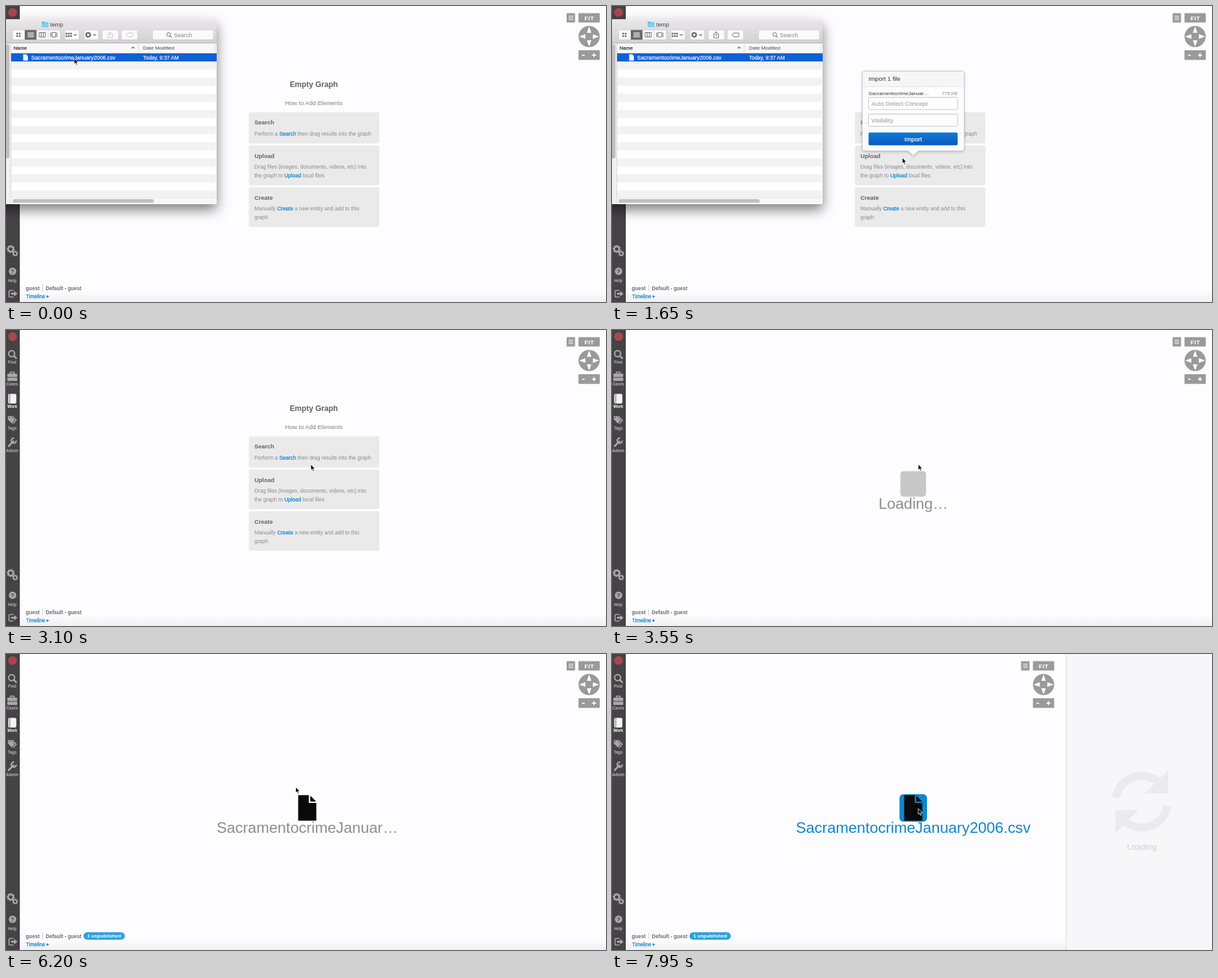
An HTML page that plays this animation: 960 px wide and 475 px high, repeating every 8 s.

```html
<!DOCTYPE html>
<html lang="en">
<head>
<meta charset="utf-8">
<title>File import</title>
<style>
  html, body { margin: 0; width: 100%; height: 100%; overflow: hidden; background: #fdfcfe; }
  svg { display: block; width: 100%; height: 100%; font-family: "Liberation Sans", Arial, sans-serif; }
  text { white-space: pre; }
  .b { font-weight: bold; }
  .mid { text-anchor: middle; }
  .link { fill: #0e86cc; stroke: #0e86cc; stroke-width: .25; }
</style>
</head>
<body>
<svg id="stage" viewBox="0 0 960 475"></svg>
<script>
const LOOP = 8000, STEP = 50;
const FILE = "SacramentocrimeJanuary2006.csv";
const SHORT = "SacramentocrimeJanuar…";
const USER = "guest";
const BLUE = "#0e86cc";

// markup helpers
const text = (x, y, size, fill, str, cls = "", more = "") =>
  `<text x="${x}" y="${y}" font-size="${size}" fill="${fill}" class="${cls}" ${more}>${str}</text>`;
const rect = (x, y, w, h, fill, r = 0, more = "") =>
  `<rect x="${x}" y="${y}" width="${w}" height="${h}" rx="${r}" fill="${fill}" ${more}/>`;
const path = (d, fill, more = "") => `<path d="${d}" fill="${fill}" ${more}/>`;
const line = (d, color, w = 1, more = "") => path(d, "none", `stroke="${color}" stroke-width="${w}" ${more}`);
const circle = (x, y, r, fill, more = "") => `<circle cx="${x}" cy="${y}" r="${r}" fill="${fill}" ${more}/>`;
const group = (id, body, more = "") => `<g id="${id}" ${more}>${body}</g>`;
const grad = (id, ...stops) => `<linearGradient id="${id}" x2="0" y2="1">` +
  stops.map((c, i) => `<stop offset="${i / (stops.length - 1)}" stop-color="${c}"/>`).join("") + `</linearGradient>`;

function defs() {
  return `<defs>
    ${grad("floor", "#fdfcfe", "#f0eff1")}
    ${grad("chrome", "#e9e7e9", "#d2d0d2")}
    ${grad("action", "#0d7bd8", "#0b59bf")}
    <filter id="shade" x="-20%" y="-20%" width="140%" height="150%">
      <feDropShadow dx="0" dy="9" stdDeviation="10" flood-opacity=".5"/></filter>
    <filter id="soft" x="-10%" y="-10%" width="120%" height="125%">
      <feDropShadow dx="0" dy="1.5" stdDeviation="2" flood-opacity=".2"/></filter>
  </defs>`;
}

function gear(x, y, r, color) {
  return circle(x, y, r * .66, "none", `stroke="${color}" stroke-width="${r * .45}"`) +
    circle(x, y, r * .88, "none",
      `stroke="${color}" stroke-width="${r * .32}" pathLength="16" stroke-dasharray="1 1"`);
}

function sidebar() {
  const c = "#a9a7a9";
  const label = (y, s, fill = "#b9b7b9") => text(10, y, 6.3, fill, s, "b mid");
  const rule = y => line(`M0 ${y}H22`, "#373537") + line(`M0 ${y + 1}H22`, "#514f51");
  return rect(0, 0, 22, 475, "#454345") + line("M21.5 0V475", "#3a383a") +
    circle(10.5, 10.5, 7, "#a8474d") +
    circle(9, 38, 4.8, "none", `stroke="${c}" stroke-width="2.2"`) +
    line("M12.6 41.6L16.2 45.2", c, 2.8, 'stroke-linecap="round"') + label(53.5, "Find") +
    rect(2, 70, 16, 5.4, c, 1.5) + rect(2, 76.4, 16, 5.4, c, 1.2) +
    line("M7 70V67.6H13V70", c, 1.6) + label(88.5, "Cases") +
    rect(3.5, 102.5, 13, 15.5, "#f4f3f4", 2) + line("M6 103V117.5", "#5b595b", 1) + label(124.5, "Work", "#fff") +
    path("M3 138H8L14 144.5L9.3 150L3 143.5Z", c) + line("M10 138L16.4 144.8L11.5 150.5", c, 1.7) +
    circle(5.3, 140.3, 1, "#454345") + label(160, "Tags") +
    line("M4.3 186.3L11.8 178.8", c, 3, 'stroke-linecap="round"') +
    line("M13 173.6A4 4 0 1 0 16.4 177.4", c, 2.4) + label(195.5, "Admin") +
    rule(206) + gear(7.6, 390, 6.2, c) + gear(14.7, 397.2, 4.4, c) + rule(411) +
    circle(10.5, 425.8, 6, c) + text(10.5, 429.3, 9.5, "#454345", "?", "b mid") + label(442.5, "Help") +
    line("M12 456.5H6.5Q4.8 456.5 4.8 458.2V465.2Q4.8 467 6.5 467H12", c, 1.6) +
    path("M8 460.3H13V457.5L18.4 461.8L13 466V463.2H8Z", c);
}

function footer() {
  const grey = "#6f6d6f";
  return rect(22, 457, 938, 18, "url(#floor)") +
    text(31.5, 455.5, 8.4, grey, USER, "b") + line("M58.5 447V458", "#cfcdcf") +
    text(63.5, 455.5, 8.25, grey, `Default - ${USER}`, "b") +
    text(32, 469, 8.2, BLUE, "Timeline", "link") + path("M65 464L69 466.2L65 468.4Z", BLUE) +
    group("badge", rect(124, 446.5, 66, 12, "#2aa1de", 6) + text(157, 455.4, 8, "#fff", "1 unpublished", "b mid"));
}

function controls() {
  const c = "#9b999b", w = "#fff";
  const arrow = a => path("M933 33L929.3 43H936.7Z", w, `transform="rotate(${a} 933 49)"`);
  return group("controls",
    rect(897, 11.5, 13.5, 15, c, 1) + line("M900 16.2H907.5M900 19H907.5M900 21.8H907.5", w, 1.1) +
    rect(916, 11.5, 34, 15, c, 1) + text(933.2, 22.5, 9.5, w, "FIT", "b mid", 'letter-spacing=".4"') +
    circle(933, 49, 17, c) + [0, 90, 180, 270].map(arrow).join("") +
    rect(916, 71, 34, 15.5, c, 1) + line("M921.8 79.2H925.8M937.6 78.8H944M940.8 75.6V82", w, 1.7));
}

function hints() {
  const body = "#8b898b", head = "#626062";
  const link = s => `<tspan class="link">${s}</tspan>`;
  const card = (y, h, title, ...rows) => rect(388.5, y, 209, h, "#ebeaeb", 3.5) +
    text(397.5, y + 19.7, 9.45, head, title, "b") +
    rows.map((s, i) => text(397.5, y + 37 + i * 13.6, 8.5, body, s)).join("");
  return group("hints",
    text(492.5, 130, 12.3, head, "Empty Graph", "b mid") +
    text(492.5, 158.7, 9.62, "#807e80", "How to Add Elements", "mid") +
    card(170.5, 50, "Search", `Perform a ${link("Search")} then drag results into the graph`) +
    card(224, 63.5, "Upload", "Drag files (images, documents, videos, etc) into",
      `the graph to ${link("Upload")} local files`) +
    card(291, 63.5, "Create", `Manually ${link("Create")} a new entity and add to this`, "graph"));
}

function popover() {
  const field = (y, s) => rect(410.5, y, 142.5, 19.5, "#fff", 2, 'stroke="#c4c2c4" fill-opacity=".85"') +
    text(415, y + 13.6, 9.75, "#949294", s);
  return group("popover",
    path("M404 104.5H560Q563.5 104.5 563.5 108V229Q563.5 232.5 560 232.5H490L482 240L474 232.5H404Q400.5 232.5 400.5 229V108Q400.5 104.5 404 104.5Z",
      "#fff", 'fill-opacity=".9" stroke="#bcbabc" stroke-width=".8" filter="url(#soft)"') +
    rect(401, 105, 162, 24, "#f6f5f6", 3, 'fill-opacity=".8"') + line("M401 129.5H563", "#e6e5e6") +
    text(410.5, 120.3, 9.76, "#333", "Import 1 file") +
    text(410.5, 143.3, 8.1, "#333", SHORT) +
    text(553, 143.3, 7.7, "#8b898b", "775 KB", "", 'text-anchor="end"') +
    field(146.5, "Auto Detect Concept") + field(173.5, "Visibility") +
    rect(410.5, 203, 142.5, 20.5, "url(#action)", 2) +
    text(482, 216.6, 9.8, "#fff", "Import", "mid", 'stroke="#fff" stroke-width=".25"'));
}

function finder() {
  const ink = "#6a686a", row = 12.95;
  const button = (x, w) => rect(x, 38.5, w, 15.5, "#fbfafb", 2.5, 'stroke="#c6c4c6" stroke-width=".6"');
  let stripes = "";
  for (let i = 1; i < 18; i += 2) stripes += rect(8, 76 + i * row, 328.5, row, "#f3f2f3");
  const dots = [0, 1, 2, 3].map(i => rect(16.5 + i % 2 * 4, 43 + (i >> 1) * 4, 2.6, 2.6, ink)).join("");
  const tiles = [0, 1, 2, 3, 4, 5].map(i =>
    rect(95.5 + i % 3 * 3.6, 43 + (i >> 1 > 0 && i > 2 ? 4 : 0), 2.6, 2.6, ink)).join("");
  const drop = x => line(`M${x} 45.2L${x + 2.3} 47.5L${x + 4.6} 45.2`, ink, 1.1);
  return group("finder",
    rect(-30, 21.5, 367, 296.5, "#fff", 4, 'filter="url(#shade)"') +
    path("M-30 21.5H333Q337 21.5 337 25.5V59.5H-30Z", "url(#chrome)") +
    line("M-30 59.5H337", "#b5b3b5") +
    path("M57 26Q57 25 58 25H61.3L62.4 26.2H67Q68 26.2 68 27.2V33Q68 34 67 34H58Q57 34 57 33Z", "#5dbbe8") +
    rect(57, 27.6, 11, 6.4, "#7fd0f3", 1) +
    text(70.8, 32.8, 9.3, "#444", "temp") +
    button(10.5, 76.5) + rect(30, 38.5, 19, 15.5, "#6b696b") + dots +
    line("M34.5 43H44.5M34.5 45.2H44.5M34.5 47.4H44.5M34.5 49.6H44.5", "#fff") +
    line("M49 38.5V54M67.5 38.5V54", "#d0ced0", .7) +
    line("M53 42.6H63V49.8H53ZM56.3 42.6V49.8M59.7 42.6V49.8", ink) +
    line("M73.5 42.6H79.5V49.8H73.5ZM71.5 42.6V49.8M81.5 42.6V49.8", ink) +
    button(94, 23) + tiles + drop(108.5) +
    button(125, 23) + gear(131.5, 46.3, 4.6, ink) + drop(139.5) +
    button(154, 26) + button(184.5, 26) +
    group("tools",
      line("M165 44.8H163V51H170.5V44.8H168.5M166.7 48.5V41.2M164.7 43L166.7 41L168.7 43", ink) +
      line("M192 46.3L194.5 43.3H202Q203 43.3 203 44.3V48.3Q203 49.3 202 49.3H194.5Z", ink)) +
    button(234.5, 97.5) + circle(260.3, 45.7, 3, "none", `stroke="${ink}"`) + line("M262.5 48L265 50.6", ink, 1.2) +
    text(268.5, 49.6, 9.2, "#858385", "Search") +
    rect(-30, 60, 367, 15.5, "#f8f7f8") + line("M8 75.5H337", "#d5d3d5", .7) +
    line("M211.5 61V75M334.5 61V75", "#d5d3d5", .8) +
    text(12.3, 69.6, 7.9, "#333", "Name", "", 'stroke="#333" stroke-width=".25"') +
    line("M201 68.2L203.3 65.8L205.6 68.2", "#555", 1.1) +
    text(219.3, 69.6, 8.1, "#444", "Date Modified") + stripes +
    rect(8, 76, 329, row, "#0f60d6") +
    path("M27.5 77.5H32.3L35 80.2V87.5H27.5Z", "#fff") + line("M32.3 77.5V80.2H35", "#b9cbe8", .6) +
    text(40.3, 85.8, 8.77, "#fff", FILE, "", 'stroke="#fff" stroke-width=".2"') +
    text(219.3, 85.8, 8.4, "#fff", "Today, 9:37 AM", "", 'stroke="#fff" stroke-width=".2"') +
    rect(-30, 60, 37.5, 258, "#f1f0f1") + line("M7.8 60V318", "#c9c7c9", .8) +
    rect(-4, 61.5, 9.5, 183, "#bfbdbf", 3) +
    rect(8, 308, 328.5, 9.5, "#f8f7f8") + line("M8 308H337", "#e3e2e3", .7) +
    rect(10.5, 310, 226, 5.8, "#c1bfc1", 2.9));
}

function node() {
  const title = (id, s, fill) => text(482, 286.6, 24.4, fill, s, "mid", id);
  const sheet = "M467.5 226.5H484.5V239H496.5V267.5H467.5ZM486.8 227.2L496.3 236.8H486.8Z";
  return group("pending", rect(461.5, 226.5, 41, 41, "#c8c7c8", 5) + title("", "Loading…", "#8f8d8f")) +
    group("untitled", circle(482, 247, 20, "#0a0a0a") + text(482, 258, 31, "#fff", "?", "b mid", 'stroke="#fff" stroke-width=".8"') +
      title("", "No title available", "#8f8d8f")) +
    group("doc", rect(460, 225, 44, 44, BLUE, 6, 'id="halo"') + path(sheet, "#0a0a0a") + title('id="title"', "", ""));
}

function panel() {
  const c = "#ebeaec";
  const half = a => `<g transform="rotate(${a} 847.5 237)">` +
    line("M806.5 230A41.5 41.5 0 0 1 876 207", c, 13) + path("M890 186V223.5H852.5Z", c) + "</g>";
  return group("panel", rect(726.5, -1, 240, 477, "#f7f6f8", 0, 'stroke="#dddcde"') +
    group("spinner", half(0) + half(180) + text(847.5, 314, 13.2, "#d0ced0", "Loading", "mid")));
}

function pointer() {
  const ghost = group("ghost",
    path("M-76 -5H-71L-68 -2V6H-76Z", "#fff", 'stroke="#dddcdd" stroke-width=".5" opacity=".85"') +
    rect(-65.5, -4.5, 140, 11, "#1767d2", 5.5, 'opacity=".92"') +
    text(-63.5, 4, 8.8, "#fff", FILE, "", 'stroke="#fff" stroke-width=".2"'));
  const plus = group("plus", circle(6.5, 15, 6.3, "#1fa321", 'stroke="#17851a" stroke-width=".6"') +
    line("M3 15H10M6.5 11.5V18.5", "#fff", 1.8));
  return group("cursor", ghost +
    group("ring", circle(0, 1, 15, "none", 'stroke="#1d1d1f" stroke-width="1.4"')) +
    path("M0 0V9.2L2.1 7.3L3.6 10.8L5.2 10.1L3.7 6.8H6.6Z", "#000", 'stroke="#fff" stroke-width=".8"') + plus);
}

const stage = document.getElementById("stage");
stage.innerHTML = defs() + rect(0, 0, 960, 475, "#fdfcfe") + footer() + sidebar() + hints() + node() +
  controls() + panel() + popover() + finder() + pointer();

const el = {};
stage.querySelectorAll("[id]").forEach(e => el[e.id] = e);
const show = (id, on) => el[id].setAttribute("opacity", +on);
const move = (id, x, y = 0) => el[id].setAttribute("transform", `translate(${x} ${y})`);
const clamp = v => Math.max(0, Math.min(1, v));
const ease = v => v * v * (3 - 2 * v);
const ramp = (t, a, b) => clamp((t - a) / (b - a));
const within = (t, a, b) => t >= a && t < b;

// time, x, y of the pointer tip
const track = [
  [0, 109, 84], [200, 109, 84], [1080, 462.5, 246], [1500, 462.5, 246], [2350, 486, 216],
  [2800, 486, 216], [3450, 490, 215.5], [3600, 490, 215.5], [4400, 464.5, 215], [5100, 463.5, 213.5],
  [6600, 463.5, 213.5], [7050, 485.5, 246], [7300, 485.5, 246], [7700, 490, 248], [8000, 490, 248]
];

function pointerAt(t) {
  const i = track.findIndex((k, n) => n && t < k[0]);
  const [a, b] = [track[i - 1], track[i]];
  const p = ease(ramp(t, a[0], b[0]));
  return [a[1] + (b[1] - a[1]) * p, a[2] + (b[2] - a[2]) * p];
}

function render(t) {
  const [x, y] = pointerAt(t);
  const dragging = within(t, 200, 1250);
  move("cursor", x, y);
  show("ghost", dragging);
  show("plus", dragging && x > 337);
  show("ring", within(t, 2400, 2650) || within(t, 7250, 7450));

  show("finder", t < 2550);
  show("tools", t < 200 ? .35 : 1);
  show("popover", ramp(t, 1300, 1450) * (1 - ramp(t, 2850, 3000)));

  show("hints", t < 3500);
  show("pending", within(t, 3500, 3900));
  show("untitled", within(t, 3900, 5600));
  show("doc", t >= 5600);
  show("badge", t >= 6100);

  const picked = t >= 7350;
  show("halo", picked);
  el.title.textContent = picked ? FILE : SHORT;
  el.title.setAttribute("fill", picked ? BLUE : "#8f8d8f");

  const slide = ease(ramp(t, 7500, 7850));
  move("controls", -242.5 * slide);
  move("panel", 236 * (1 - slide));
  show("spinner", ramp(t, 7650, 7900));
}

const start = performance.now();
function tick(now) {
  const t = Math.max(0, now - start) % LOOP;
  render(Math.floor(t / STEP) * STEP);
  requestAnimationFrame(tick);
}
render(0);
requestAnimationFrame(tick);
</script>
</body>
</html>
```
